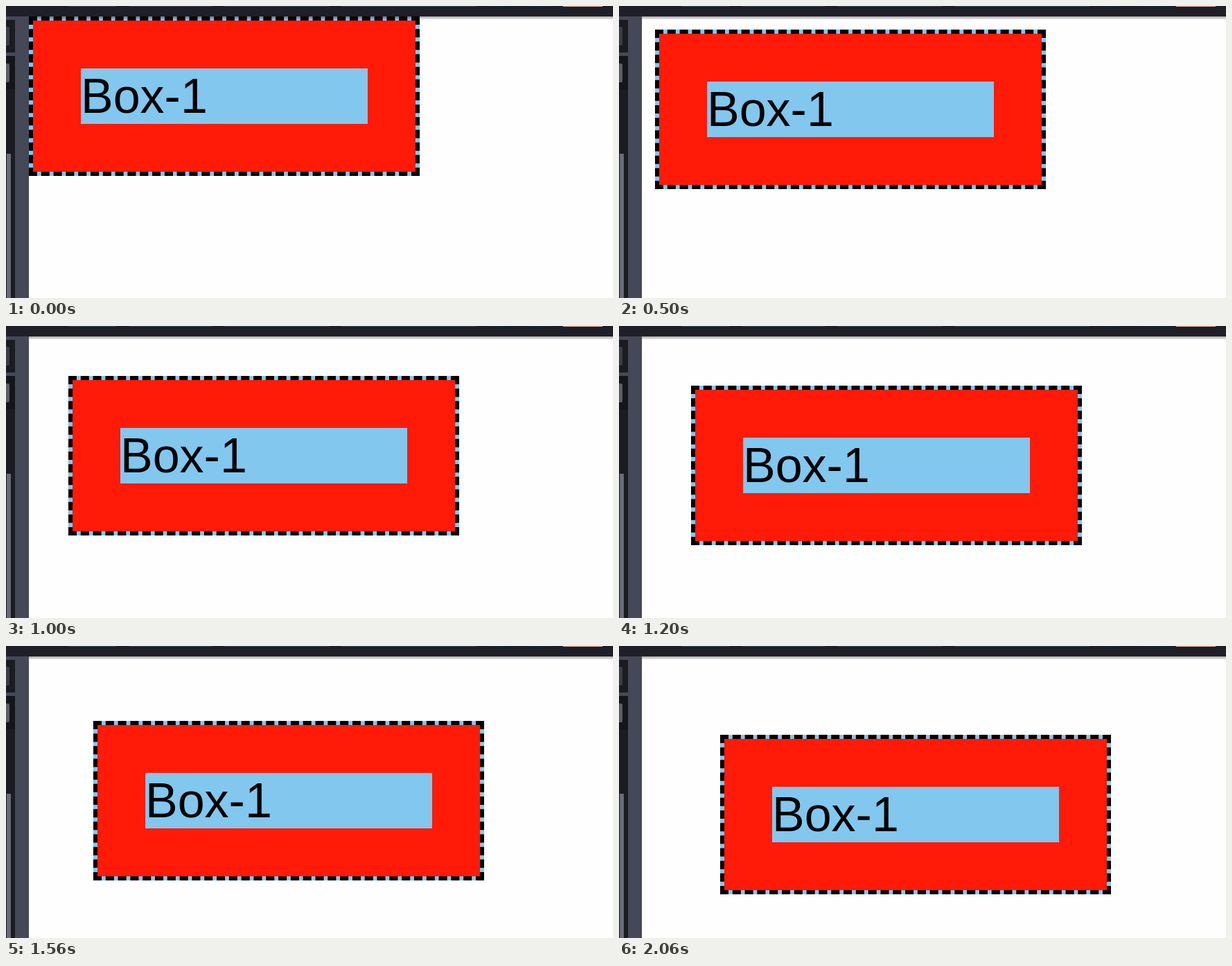
An HTML page with a canvas for the animation above (2.1 s loop, 876x421 px).

```html
<!DOCTYPE html>
<html lang="en">
<head>
<meta charset="utf-8">
<title>Moving box</title>
<style>
  html, body { margin: 0; width: 100%; height: 100%; overflow: hidden; background: #fefefe; }
  #stage { position: relative; width: 876px; height: 421px; overflow: hidden; }
  #stage div, canvas { position: absolute; }
  canvas { left: 0; top: 0; }
  #box {
    left: 33px; top: 15px; width: 564px; height: 230px;
    box-sizing: border-box; padding: 69px; border: 6px dashed #000;
    font: 70px/80px "Liberation Sans", Arial, sans-serif; color: #000;
    white-space: nowrap;
    background:
      linear-gradient(#82c7ee, #82c7ee) content-box,
      linear-gradient(#ff1b07, #ff1b07) padding-box,
      linear-gradient(#82c7ee, #82c7ee) border-box;
  }
</style>
</head>
<body>
<div id="stage">
  <div id="box">Box-1</div>
  <canvas id="frame" width="876" height="421"></canvas>
</div>
<script>
const LOOP = 2100;
const box = document.getElementById('box');
const ctx = document.getElementById('frame').getContext('2d');

function rect(color, x, y, w, h) {
  ctx.fillStyle = color;
  ctx.fillRect(x, y, w, h);
}

function drawEditor() {
  // Shadow below the top bar
  const shade = ctx.createLinearGradient(0, 15, 0, 20);
  shade.addColorStop(0, 'rgba(30,20,30,.4)');
  shade.addColorStop(1, 'rgba(30,20,30,0)');
  rect(shade, 33, 15, 843, 5);

  // Side panels and divider
  rect('#444857', 0, 14, 33, 407);
  rect('#1b1c21', 0, 20, 13, 47);
  rect('#1b1c21', 0, 72, 13, 349);
  rect('#15161a', 0, 72, 13, 48);
  ctx.fillStyle = '#3b3d46';
  ctx.beginPath();
  ctx.roundRect(-4, 30, 9, 27, 2);
  ctx.fill();
  ctx.fillStyle = '#5c5e66';
  ctx.beginPath();
  ctx.roundRect(-4, 83, 9, 27, 2);
  ctx.fill();
  rect('#6a6b78', 1, 213, 6, 208);

  // Top bar with the lower edges of its buttons
  rect('#1e1f27', 0, 0, 876, 15);
  for (const [x, w] of [[90, 69], [178, 119], [315, 151], [484, 195]]) {
    rect('#3b3f4f', x, 0, w, 1);
  }
  rect('#1b2740', 697, 0, 24, 1);
  rect('#1b2740', 756, 0, 29, 1);
  rect('#e5b3a8', 804, 0, 57, 1);
}

// Diagonal path: [step, offset]
const path = [[0, 0], [8, 8], [16, 21], [21, 33], [30, 57], [41, 81], [47, 93], [62, 113]];
const last = path.length - 1;

const slope = k => (path[k + 1][1] - path[k][1]) / (path[k + 1][0] - path[k][0]);

function tangent(k) {
  if (k === 0) return 0.6;
  if (k === last) return 1.07;
  const before = path[k][0] - path[k - 1][0];
  const after = path[k + 1][0] - path[k][0];
  return (slope(k - 1) * after + slope(k) * before) / (before + after);
}

function offsetAt(step) {
  let k = 0;
  while (k < last - 1 && step >= path[k + 1][0]) k++;
  const [x0, y0] = path[k], [x1, y1] = path[k + 1];
  const d = x1 - x0, u = (step - x0) / d, v = 1 - u;
  return y0 * v * v * (1 + 2 * u) + y1 * u * u * (3 - 2 * u)
    + d * u * v * (tangent(k) * v - tangent(k + 1) * u);
}

// 30 steps per second, each start rounded down to 10 ms
function stepAt(t) {
  const n = Math.floor(t * 0.03);
  return Math.floor((n + 1) * 10 / 3) * 10 <= t ? n + 1 : n;
}

function render(now) {
  const step = Math.min(62, stepAt(now % LOOP));
  const d = Math.round(offsetAt(step));
  box.style.left = 33 + d + 'px';
  box.style.top = 15 + d + 'px';
}

drawEditor();
let start;
function tick(now) {
  if (start === undefined) start = now;
  render(now - start);
  requestAnimationFrame(tick);
}
render(0);
requestAnimationFrame(tick);
</script>
</body>
</html>
```
